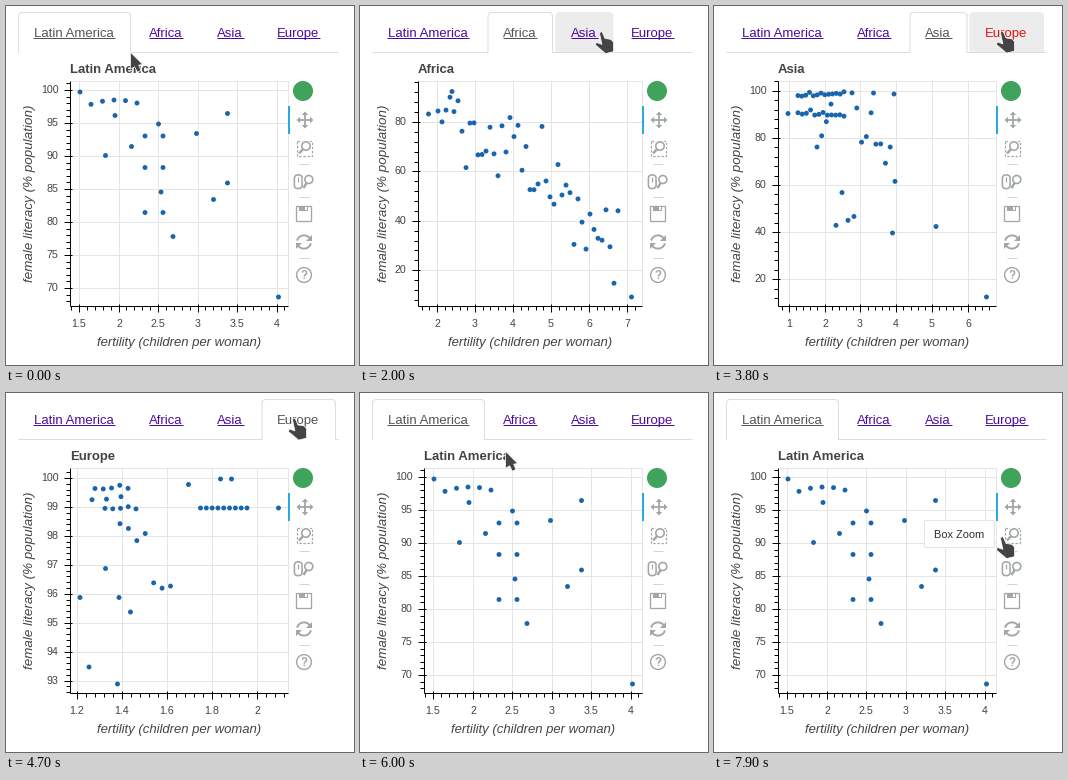
Animation of 348x359 px, one loop 8000 ms. Source, as a matplotlib script:

```python
import numpy as np
import matplotlib.pyplot as plt
from matplotlib.animation import FuncAnimation
from matplotlib.patches import Circle, FancyBboxPatch, PathPatch, Polygon, Rectangle
from matplotlib.path import Path

W, H, DPI = 348, 359, 64
STEP, LOOP = 100, 8000
INK, GRAY, LINE, DOT = "#444444", "#a1a6a9", "#e5e5e5", "#1965ad"
VISITED, PRESSED, ACTIVE = "#4c0aa0", "#e3160f", "#555555"
RIGHT, TOP, BOTTOM = 282, 75, 300

plt.rcParams["font.family"] = "Liberation Sans"
fig = plt.figure(figsize=(W / DPI, H / DPI), dpi=DPI, facecolor="white")
ax = fig.add_axes([0, 0, 1, 1])
ax.set_xlim(0, W)
ax.set_ylim(H, 0)
ax.axis("off")


def pt(px):
    return px * 72 / DPI


# Straight lines snap to pixels, so whole numbers name pixel rows and columns.
def line(xs, ys, color=GRAY, lw=1, z=2, **kw):
    return ax.plot(xs, ys, color=color, lw=pt(lw), zorder=z,
                   solid_capstyle="butt", **kw)[0]


def text(x, y, s, px=13.15, color=INK, z=4, **kw):
    kw.setdefault("va", "baseline")
    return ax.text(x, y, s, fontsize=pt(px), color=color, zorder=z, **kw)


def patch(p, z=2):
    p.set_zorder(z)
    return ax.add_patch(p)


# ---- charts -------------------------------------------------------------

def ticks(first, pos, unit, step, lo, hi):
    """Value, pixel and major flag; `first` sits at `pos`, five minors a step."""
    for i in range(-60, 61):
        p = pos + i * step / 5 * unit
        if lo <= p <= hi:
            yield first + i * step / 5, int(p), i % 5 == 0


def chart(title, left, x_axis, y_axis, points):
    out = [line([left, RIGHT, RIGHT], [TOP, TOP, BOTTOM], LINE)]
    for v, p, major in ticks(*x_axis, left, RIGHT):
        if major:
            out.append(line([p, p], [TOP, BOTTOM], LINE, z=1))
            out.append(text(p, 321, f"{v:g}", 10.67, ha="center"))
        a, b = (-2, 6) if major else (0, 4)
        out.append(line([p, p], [BOTTOM + a, BOTTOM + b], "black", z=3))
    for v, p, major in ticks(*y_axis, TOP, BOTTOM):
        if major:
            out.append(line([left, RIGHT], [p, p], LINE, z=1))
            out.append(text(left - 11.4, p + 3.4, f"{v:g}", 10.67, ha="right"))
        a, b = (-6, 2) if major else (-4, 0)
        out.append(line([left + a, left + b], [p, p], "black", z=3))
    out.append(line([left, left], [TOP, BOTTOM], "black", z=3))
    out.append(line([left, RIGHT], [BOTTOM, BOTTOM], "black", z=3))
    out += [patch(Circle(p, 2.45, fc=DOT, lw=0), 4) for p in points]
    out.append(text(left, 67, title, weight="bold"))
    out.append(text((left + RIGHT) / 2, 340, "fertility (children per woman)",
                    style="italic", ha="center"))
    return out


def run(x0, y0, x1, y1, n, spread=0.0, seed=1):
    """n points along a segment, scattered up and down by `spread`."""
    noise = np.random.default_rng(seed).normal(0, 1, n) * spread
    return np.c_[np.linspace(x0, x1, n), np.linspace(y0, y1, n) + noise]


def latin_points():
    x = np.linspace(85, 131, 5)
    arc = np.c_[x, 94 + ((x - 110) / 12) ** 2]
    pairs = [(148 + s * 9, y) for y in (130, 161.5, 206.5) for s in (-1, 1)]
    lone = [(74, 86), (109, 109.5), (152.5, 118), (99.5, 149.5), (155, 186),
            (125.5, 140.5), (167, 230.5), (190.5, 127.5), (221.5, 107.5),
            (221.5, 177), (207.5, 193.5), (272.5, 291)]
    return np.vstack([arc, pairs, lone])


def africa_points():
    cloud = run(78, 105, 258, 245, 46, 26, seed=7)
    cloud[:, 1] = np.clip(cloud[:, 1], 87, 284)
    return np.vstack([cloud, [(68.5, 108), (92, 85.5), (271.5, 291)]])


def asia_points():
    return np.vstack([
        run(84, 89, 130, 87, 13, 1.6), run(84, 106, 130, 109, 12, 2.2),
        run(103, 140, 117, 102, 4, 3), run(138, 96, 181, 172, 10, 14, seed=4),
        run(122, 203, 140, 215, 4, 8, seed=3),
        [(74, 107.5), (159.5, 87), (180, 88), (178.5, 227), (222, 220.5),
         (272.5, 291)]])


def europe_points():
    return np.vstack([
        run(89, 95, 122, 94, 5, 1.5), run(86, 106, 115, 103, 3, 2),
        run(99, 115, 130, 115, 5, 1), run(194.5, 115, 241, 115, 9),
        run(114, 129, 164.5, 196, 7, 9, seed=2),
        [(74, 204.5), (99.5, 175.5), (113, 204.5), (124.5, 219), (83, 274),
         (111.5, 291), (182.5, 91.5), (214.5, 86), (225.5, 86), (272.5, 115)]])


# Each axis: first major value, its pixel, pixels per unit, major step.
charts = {
    "Latin America": chart("Latin America", 64, (1.5, 73.5, 79, 0.5),
                           (100, 84.5, -6.6, 5), latin_points()),
    "Africa": chart("Africa", 58, (2, 77.5, 38, 1),
                    (80, 116.5, -2.47, 20), africa_points()),
    "Asia": chart("Asia", 64, (1, 75.3, 35.8, 1),
                  (100, 85.3, -2.356, 20), asia_points()),
    "Europe": chart("Europe", 64, (1.2, 71.5, 225, 0.2),
                    (100, 85.5, -28.93, 1), europe_points()),
}
text(23.7, 187.6, "female literacy (% population)", 13.33, style="italic",
     rotation=90, ha="center", va="center")


# ---- tabs ---------------------------------------------------------------

class Tab:
    def __init__(self, name, x0, x1):
        self.name, self.x0, self.x1 = name, x0, x1
        a, b, r, top, low = x0 + 0.5, x1 - 0.5, 4, 6.5, 47
        verts = [(a, low), (a, top + r), (a, top), (a + r, top),
                 (b - r, top), (b, top), (b, top + r), (b, low)]
        codes = [1, 2, 3, 3, 2, 3, 3, 2]
        self.box = patch(PathPatch(Path(verts, codes), lw=pt(1),
                                   capstyle="butt"))
        self.label = text(x0 + 15.7, 31, name)
        self.rule = line([x0 + 15, x1 - 16], [32, 32], z=4)

    def has(self, x, y):
        return self.x0 < x < self.x1 and 6 < y < 46

    def show(self, active, hover, pressed, ruled):
        color = ACTIVE if active else PRESSED if pressed else VISITED
        self.label.set_color(color)
        self.rule.set_color(color)
        self.rule.set_visible(ruled)
        self.box.set_visible(active or hover)
        self.box.set_facecolor("white" if active else "#ececec")
        self.box.set_edgecolor("#dddddd" if active else "#ececec")
        self.box.set_zorder(3 if active else 1)


tabs = [Tab("Latin America", 12, 125), Tab("Africa", 127.5, 193),
        Tab("Asia", 195.5, 253.5), Tab("Europe", 255.5, 330)]
line([12, 332], [46, 46], "#dddddd")


# ---- toolbar ------------------------------------------------------------

def lens(x, y, r, tx, ty):
    """Magnifier with its handle running to (tx, ty)."""
    patch(Circle((x, y), r + 2, fc="white", lw=0))
    patch(Circle((x, y), r, fill=False, ec=GRAY, lw=pt(1.6)))
    d = np.hypot(tx - x, ty - y)
    line([x + (tx - x) * r / d, tx], [y + (ty - y) * r / d, ty], lw=2.4)


def fill(pts):
    patch(Polygon(pts, fc=GRAY, lw=0))


patch(Circle((297, 85), 10, fc="#3fa35b", lw=0))
patch(Rectangle((282, 100), 2, 28, fc="#26aae1", lw=0), 4)

# pan
for dx, dy in ((1, 0), (-1, 0), (0, 1), (0, -1)):
    c, d, n = np.array([299, 114]), np.array([dx, dy]), np.array([dy, dx])
    line(*zip(c, c + 6 * d), lw=1.8)
    fill([c + 8.5 * d, c + 5 * d + 3.2 * n, c + 5 * d - 3.2 * n])

# box zoom
patch(Rectangle((290.5, 134.5), 15, 15, fill=False, ec=GRAY, lw=pt(1.2),
                ls=(0, (2, 1.4))))
lens(300, 140, 4.2, 293, 147.5)

# wheel zoom
patch(FancyBboxPatch((291, 171.5), 2.5, 8.5, fill=False, ec=GRAY, lw=pt(1.6),
                     boxstyle="round,pad=2.6,rounding_size=3.6"))
line([292, 292], [171, 176], lw=1.2)
lens(302.8, 173.5, 4, 297.5, 182)

# save
patch(Rectangle((290, 200), 15, 15, fill=False, ec=GRAY, lw=pt(1.3)))
patch(Rectangle((293, 200), 9, 5, fc=GRAY, lw=0))
patch(Rectangle((299, 201), 2, 3, fc="white", lw=0))

# reset
arc = np.linspace(np.pi + 0.2, 2 * np.pi - 0.5, 24)
for s in (1, -1):
    line(298 + s * 7 * np.cos(arc), 236 + s * 6.6 * np.sin(arc), lw=1.9)
    fill([(298 + s * u, 236 - s * v) for u, v in ((8, 7), (8, 1), (2, 1))])

# help
patch(Circle((298, 269), 7.4, fill=False, ec=GRAY, lw=pt(1.4)))
text(298, 273, "?", 11.5, GRAY, ha="center", weight="bold")

for y in (158, 191, 252):
    line([293, 303], [y, y], "#d3d3d3")

tip = [patch(Rectangle((210, 127), 70, 27, fc="white", ec=LINE, lw=pt(1)), 6),
       text(220, 145, "Box Zoom", 11, "#2f2f2f", z=7)]


# ---- pointer ------------------------------------------------------------

SHAPES = {
    "arrow": [(0, 0), (0, 17), (4.2, 14.6), (6.8, 20), (10.4, 18.2),
              (8.2, 12.9), (12.4, 12.3)],
    "hand": [(-1.6, 0.8), (1, -0.5), (4, 6.4), (10, 7.4), (12.4, 10),
             (12.6, 19.6), (4.6, 21.6), (-5.6, 13), (-4.6, 10.4), (0.9, 12.4)],
}
pointer = patch(Polygon(SHAPES["arrow"], fc="#454347", ec="white", lw=pt(0.7),
                        joinstyle="round"), 9)

# start, steps, shape on arrival, x, y
MOVES = [
    (600, 3, "hand", 166, 26), (1700, 2, "arrow", 173, 27),
    (2000, 1, "hand", 241, 26), (3300, 1, "arrow", 246, 27.5),
    (3400, 2, "hand", 288, 25.5), (4800, 4, "hand", 95, 30),
    (5400, 1, "arrow", 89, 29), (6000, 4, "arrow", 315, 146),
    (6600, 1, "hand", 281, 131), (6700, 3, "arrow", 315, 146),
    (7100, 1, "hand", 288, 144)]
# mouse down, tab opens, tab
CLICKS = [(0, 0, "Latin America"), (1200, 1300, "Africa"), (2400, 2600, "Asia"),
          (3800, 4000, "Europe"), (5400, 6000, "Latin America")]


def pointer_at(t):
    kind, x, y = "arrow", 124.5, 46.2
    for start, steps, shape, tx, ty in MOVES:
        if t < start:
            break
        part = min(1, ((t - start) / STEP + 1) / steps)
        kind = shape if part == 1 else "arrow"
        x, y = x + (tx - x) * part, y + (ty - y) * part
    return kind, x, y


def draw(i):
    t = i * STEP
    scene = [name for _, opens, name in CLICKS if t >= opens][-1]
    held = [name for down, opens, name in CLICKS if down <= t < opens]
    kind, x, y = pointer_at(t)
    for name, parts in charts.items():
        for p in parts:
            p.set_visible(name == scene)
    for tab in tabs:
        active, hover = tab.name == scene, tab.has(x, y)
        pressed = tab.name in held
        focus = 2600 <= t < 3000
        ruled = not pressed and (focus or not (active and hover))
        tab.show(active, hover, pressed, ruled)
    for p in tip:
        p.set_visible(t >= 6600)
    pointer.set_xy(np.array(SHAPES[kind]) + (x, y))
    return []


anim = FuncAnimation(fig, draw, frames=LOOP // STEP, interval=STEP,
                     init_func=lambda: draw(0), repeat=True, repeat_delay=0,
                     blit=False)
plt.show()
```
